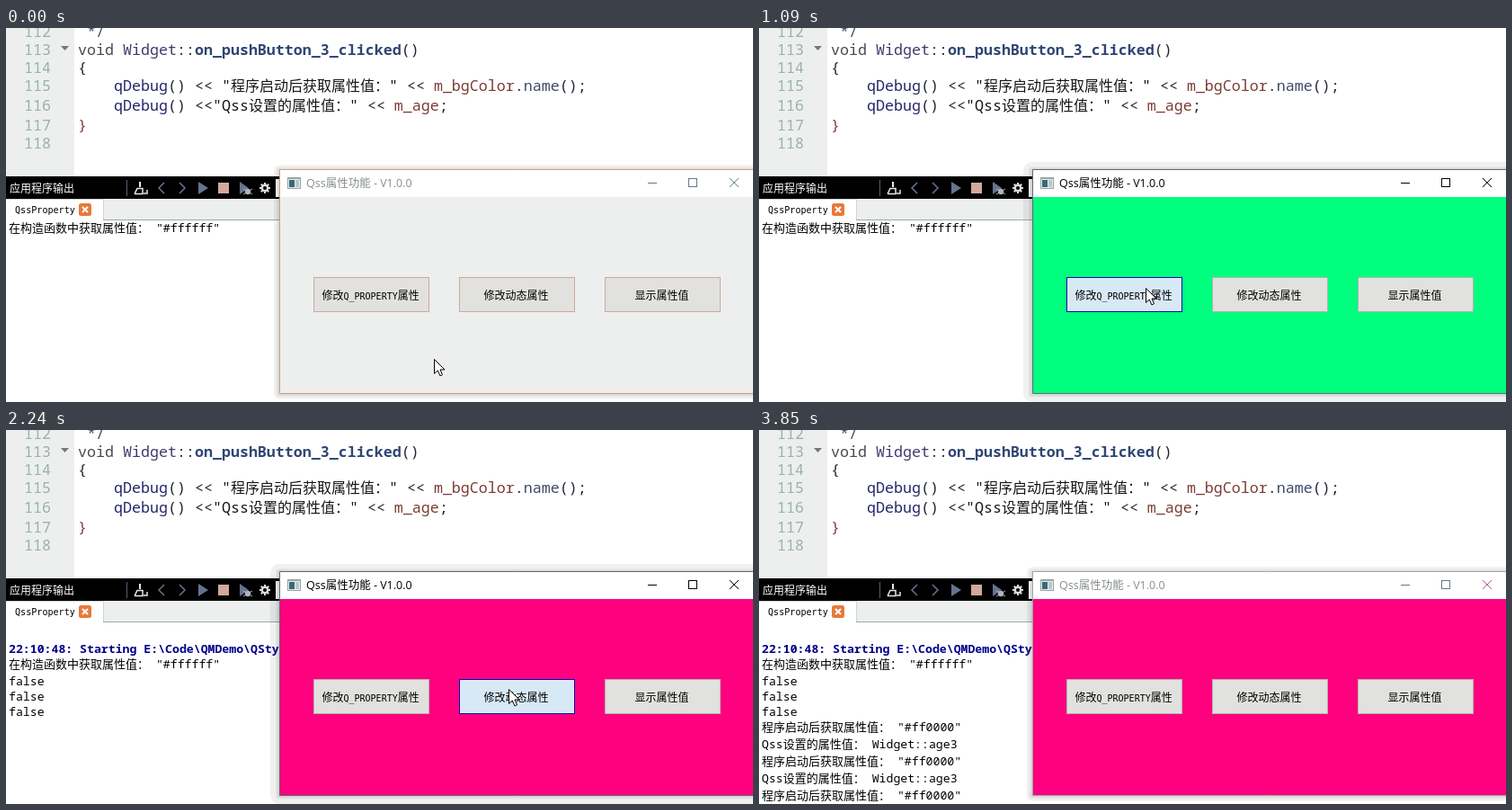
Write an HTML page with a canvas that moves like this. It is 831 by 416 pixels and loops after 3920 ms.

```html
<!DOCTYPE html>
<html lang="zh">
<head>
<meta charset="utf-8">
<style>
html, body { margin: 0; width: 100%; height: 100%; overflow: hidden; background: #fff; }
canvas { display: block; }
</style>
</head>
<body>
<canvas id="stage" width="831" height="416"></canvas>
<script>
const c = document.getElementById('stage').getContext('2d');
const LOOP = 3920;
const MONO = '"Noto Sans Mono", monospace';
const CJK = '"Noto Sans CJK SC", "Noto Sans CJK", sans-serif';
const GREEN = '#00ff7f', PINK = '#ff007f', GREY = '#f0f0f0';

// Pointer tip: time, x, y
const path = [
  [50, 476, 368], [450, 430, 289], [1300, 430, 289], [1650, 559, 288], [2310, 559, 288],
  [2560, 650, 306], [2830, 727, 301], [3420, 727, 301], [3540, 690, 358], [3670, 655, 420]
];
const presses = [
  [530, 620], [800, 880], [960, 1030], [1160, 1230], [1770, 1850],
  [1930, 1980], [2050, 2110], [2900, 2960], [3060, 3110], [3200, 3290]
];
const fills = [
  [0, GREY], [620, GREEN], [880, GREY], [1030, GREEN], [1230, GREY],
  [1850, PINK], [1980, GREY], [2110, PINK]
];
const buttons = [[342, '修改Q_PROPERTY属性'], [504, '修改动态属性'], [666, '显示属性值']];
const falseTimes = [1850, 1980, 2110];
const valueTimes = [2960, 3110, 3290];

function rect(x, y, w, h, color) {
  c.fillStyle = color;
  c.fillRect(x, y, w, h);
}

function roundRect(x, y, w, h, r, color) {
  c.beginPath();
  c.roundRect(x, y, w, h, r);
  c.fillStyle = color;
  c.fill();
}

function box(x, y, w, h, color) {
  c.strokeStyle = color;
  c.lineWidth = 1;
  c.strokeRect(x + .5, y + .5, w - 1, h - 1);
}

function line(points, color, width = 1) {
  c.beginPath();
  points.forEach(([x, y]) => c.lineTo(x, y));
  c.strokeStyle = color;
  c.lineWidth = width;
  c.stroke();
}

function poly(points, color) {
  c.beginPath();
  points.forEach(([x, y]) => c.lineTo(x, y));
  c.closePath();
  c.fillStyle = color;
  c.fill();
}

function disc(x, y, r, color) {
  c.beginPath();
  c.arc(x, y, r, 0, 7);
  c.fillStyle = color;
  c.fill();
}

// Latin and CJK parts use separate fonts; returns the end position.
function text(str, x, y, latin, cjk, color) {
  c.fillStyle = color;
  for (const part of str.split(/([\u3000-\uffef]+)/)) {
    c.font = /[\u3000-\uffef]/.test(part) ? cjk : latin;
    c.fillText(part, x, y);
    x += c.measureText(part).width;
  }
  return x;
}

function code(y, x, ...runs) {
  for (const [str, color, bold] of runs)
    x = text(str, x, y, `${bold ? 'bold ' : ''}16.67px ${MONO}`, `16px ${CJK}`, color);
}

function log(str, y, color = '#000', weight = '') {
  text(str, 3, y, `${weight} 13.2px ${MONO}`, `13px ${CJK}`, color);
}

function editor() {
  const ink = '#222430', field = '#7a3c34', call = '#25256a';
  rect(0, 0, 831, 165, '#fff');
  rect(0, 0, 76, 165, '#edefee');
  const rows = [10, 30, 50, 70, 92, 114, 134];
  rows.forEach((y, i) => code(y, 20, [String(112 + i), '#97b1ad']));
  poly([[61, 20], [70, 20], [65.5, 25]], '#777');
  code(rows[0], 80, [' */', '#33506a']);
  code(rows[1], 80, ['void', '#4c4850'], [' ', ink], ['Widget', '#43396f'], ['::', ink],
    ['on_pushButton_3_clicked', '#2f4674', true], ['()', ink]);
  code(rows[2], 80, ['{', ink]);
  code(rows[3], 120, ['qDebug', call], ['() << ', ink], ['"程序启动后获取属性值："', '#161616'],
    [' << ', ink], ['m_bgColor', field], ['.', ink], ['name', '#40486c'], ['();', ink]);
  code(rows[4], 120, ['qDebug', call], ['() <<', ink], ['"Qss设置的属性值："', '#161616'],
    [' << ', ink], ['m_age', field], [';', ink]);
  code(rows[5], 80, ['}', field]);
}

function toolbar() {
  const dim = '#64748f', light = '#e8e8e8';
  rect(0, 165, 305, 25, '#000');
  text('应用程序输出', 4, 183, `12px ${CJK}`, `12px ${CJK}`, '#fff');
  line([[134.5, 169], [134.5, 187]], '#53617a');
  line([[149, 171], [149, 177]], light, 2);
  line([[143, 184.5], [146, 178.5], [152, 178.5], [152, 184.5], [143, 184.5]], light, 1.5);
  line([[153, 184], [157, 184], [157, 180]], light, 1.5);
  line([[176, 172], [170, 178], [176, 184]], dim, 1.5);
  line([[193, 172], [199, 178], [193, 184]], dim, 1.5);
  poly([[214, 171], [225, 178], [214, 185]], dim);
  rect(236, 172, 12, 12, '#d2aa9c');
  poly([[260, 171], [270, 178], [260, 185]], dim);
  disc(269, 182, 3.2, '#aeb4bb');
  line([[264, 185], [274, 179]], '#aeb4bb');
  line([[264, 179], [274, 185]], '#aeb4bb');
  for (let i = 0; i < 4; i++) {
    const a = i * Math.PI / 4, dx = 6 * Math.cos(a), dy = 6 * Math.sin(a);
    line([[288 - dx, 178 - dy], [288 + dx, 178 + dy]], '#dcdcdc', 2);
  }
  disc(288, 178, 4.4, '#dcdcdc');
  disc(288, 178, 2, '#000');
  rect(300, 168, 5, 20, '#fff');
}

function output(t) {
  rect(0, 190, 305, 226, '#fff');
  rect(108, 190, 197, 24, '#edefee');
  line([[0, 190.5], [108.5, 190.5], [108.5, 213.5]], '#d0d5d4');
  line([[108, 213.5], [305, 213.5]], '#98acac');
  text('QssProperty', 10, 206, '10.1px "DejaVu Sans Mono", monospace', `12px ${CJK}`, '#000');
  roundRect(81, 195, 14, 14, 2.5, '#e8793a');
  line([[85, 199], [91, 205]], '#fff', 2);
  line([[91, 199], [85, 205]], '#fff', 2);

  const first = '在构造函数中获取属性值： "#ffffff"';
  if (t < falseTimes[0]) return log(first, 227);
  log('22:10:48: Starting E:\\Code\\QMDemo\\QStyle', 248, '#00008b', 'bold');
  log(first, 265);
  falseTimes.forEach((at, i) => { if (t >= at) log('false', 284 + 17 * i); });
  valueTimes.forEach((at, i) => {
    if (t < at) return;
    log('程序启动后获取属性值： "#ff0000"', 335 + 38 * i);
    log('Qss设置的属性值： Widget::age3', 354 + 38 * i);
  });
}

// Banded drop shadow, darker towards the window and slightly lowered.
function shadow(active) {
  for (const d of active ? [10, 4, 2] : [6, 3, 1])
    roundRect(304 - d, 158 - d * .9, 560, 249 + d * 1.8, d, 'rgba(0,0,0,.06)');
}

function titleBar(active, t) {
  rect(305, 158, 526, 30, '#fff');
  rect(313, 166, 15, 13, '#9aa3a8');
  rect(314, 168, 13, 10, '#e6ecee');
  rect(315, 169, 6, 8, '#3c6878');
  rect(322, 169, 4, 8, '#b9c8cc');
  text('Qss属性功能 - V1.0.0', 334, 177, '12.5px "Open Sans", sans-serif', `12.5px ${CJK}`,
    active ? '#000' : '#87908a');
  const ink = active ? '#000' : '#6a7488';
  const close = active ? '#000' : t > 3000 ? '#a8649a' : '#5f8a90';
  line([[714, 172.5], [724, 172.5]], ink);
  box(759, 167, 10, 10, ink);
  line([[805, 167], [815, 177]], close);
  line([[815, 167], [805, 177]], close);
}

function pointerAt(t) {
  if (t >= 3670) return null;
  let i = 0;
  while (i < path.length - 2 && t >= path[i + 1][0]) i++;
  const [a, b] = [path[i], path[i + 1]];
  const k = Math.max(0, Math.min(1, (t - a[0]) / (b[0] - a[0])));
  return [a[1] + (b[1] - a[1]) * k, a[2] + (b[2] - a[2]) * k];
}

function drawButton(x, label, hover, pressed, plain) {
  rect(x, 277, 129, 39, hover ? (pressed ? '#dcebf9' : '#d8e9f6') : '#e1e1df');
  box(x, 277, 129, 39, hover ? '#0808b0' : plain ? '#cda99b' : '#b2b2ae');
  const latin = '10px "DejaVu Sans Mono", monospace';
  const cjk = `12px ${CJK}`;
  const width = [...label].reduce((w, ch) => w + (ch > '\u3000' ? 12 : 6), 0);
  text(label, x + 63.5 - width / 2, 302, latin, cjk, '#000');
}

function arrow(x, y) {
  const shape = [[0, 0], [0, 16], [3.8, 12.5], [6.4, 18.4], [9, 17.2], [6.5, 11.5], [11.5, 11.5]];
  const points = shape.map(([dx, dy]) => [x + dx, y + dy]);
  poly(points, '#fff');
  line([...points, points[0]], '#000');
}

function appWindow(t) {
  const active = t >= 530 && t < 3850;
  const pressed = presses.some(([a, b]) => t >= a && t < b);
  const fill = fills.filter(([at]) => t >= at).pop()[1];
  const plain = fill === GREY;
  const tip = pointerAt(t);
  shadow(active);
  titleBar(active, t);
  rect(305, 188, 526, 218, plain && !active ? '#edefee' : fill);
  const edge = active ? '#5c6a76' : plain ? '#cf9f8e' : '#a4a4a4';
  line([[832, 157.5], [304.5, 157.5], [304.5, 406.5], [832, 406.5]], edge);
  for (const [x, label] of buttons) {
    const hover = tip && tip[0] >= x && tip[0] < x + 129 && tip[1] >= 277 && tip[1] < 316;
    drawButton(x, label, hover, pressed, plain);
  }
  if (!tip) return;
  if (pressed) disc(tip[0], tip[1], 12, 'rgba(220,211,40,.84)');
  arrow(Math.round(tip[0]) + .5, Math.round(tip[1]) + .5);
}

function frame() {
  const t = performance.now() % LOOP;
  editor();
  toolbar();
  output(t);
  rect(305, 165, 526, 251, '#fff');
  appWindow(t);
  requestAnimationFrame(frame);
}
frame();
</script>
</body>
</html>
```
